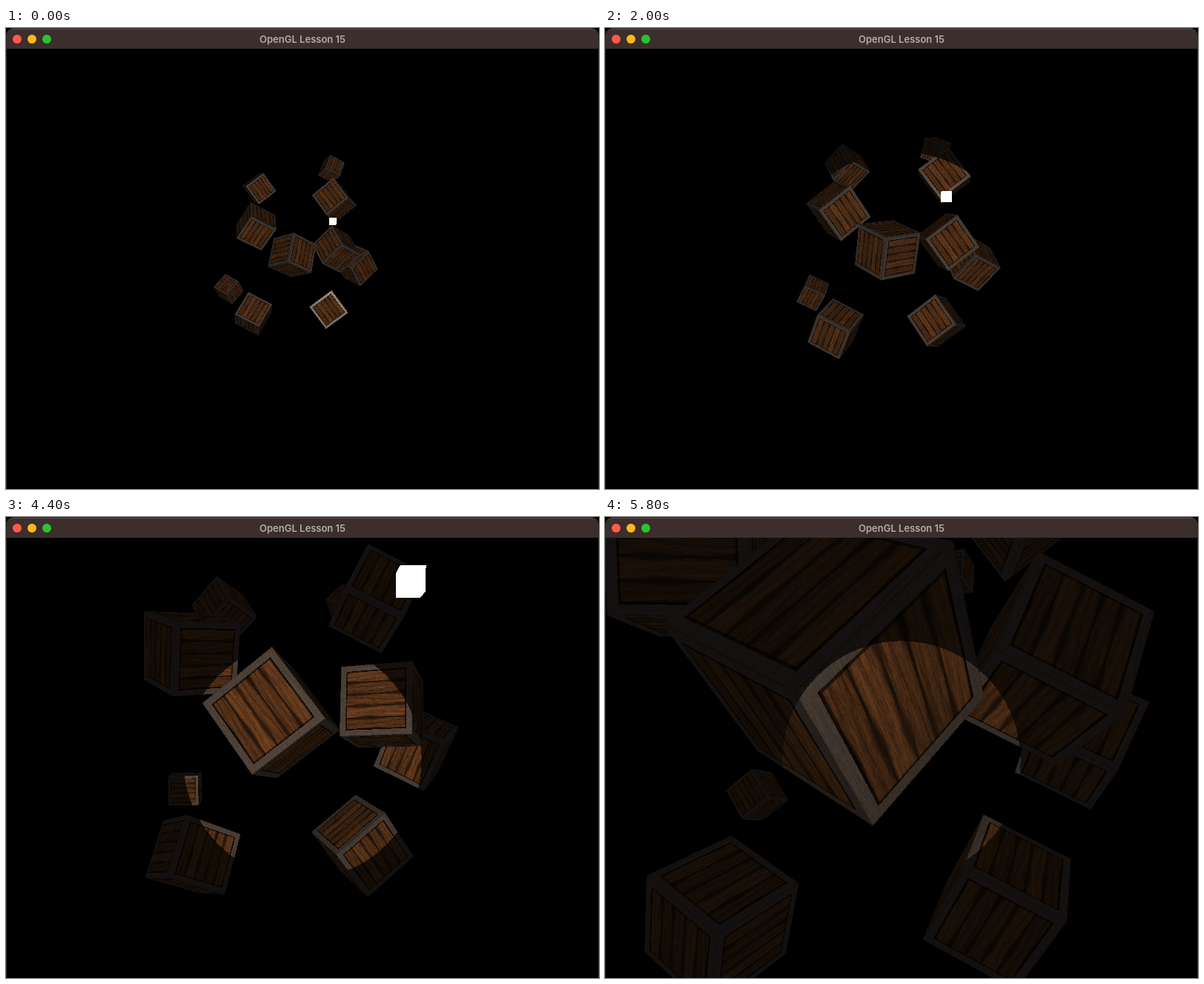
An HTML page with a canvas for the animation above (5900 ms loop, 800x622 px).

```html
<!DOCTYPE html>
<html>
<head>
<meta charset="utf-8">
<style>
  html, body { margin: 0; width: 100%; height: 100%; overflow: hidden; background: #000; }
  #win { position: relative; width: 800px; height: 622px; overflow: hidden; }
  canvas { position: absolute; left: 0; top: 28px; }
  #bar { position: absolute; left: 1px; top: 1px; width: 798px; height: 27px; box-sizing: border-box;
    border-top: 1px solid #5c504c; border-radius: 9px 9px 0 0; background: #3b2e2c;
    font: 600 13px/26px Inter, sans-serif; color: #b5aca8; text-align: center; }
  #bar i { position: absolute; top: 7px; width: 12px; height: 12px; border-radius: 50%; }
  #edge { position: absolute; inset: 0 0 -12px 0; border: 1px solid #2c2825; border-radius: 10px 10px 0 0; }
</style>
</head>
<body>
<div id="win">
  <canvas id="view" width="800" height="594"></canvas>
  <div id="edge"></div>
  <div id="bar">
    <i style="left:8px;background:#ff5a46"></i>
    <i style="left:28px;background:#ffb81c"></i>
    <i style="left:48px;background:#28c430"></i>
    OpenGL Lesson 15
  </div>
</div>
<script>
const W = 800, H = 594, CX = 400, CY = 300;
const FOCAL = 300 / Math.tan(Math.PI / 8);        // 45 degree field of view
const SPOT = Math.tan(12.5 * Math.PI / 180) ** 2;
const LOOP = 5900, STEP = 100, SPEED = 2.5;
const YAW = -0.004, PITCH = 0.0405;
const CUBES = [
  [0, 0, 0], [2, 5, -15], [-1.5, -2.2, -2.5], [-3.8, -2, -12.3], [2.4, -0.4, -3.5],
  [-1.7, 3, -7.5], [1.3, -2, -2.5], [1.5, 2, -2.5], [1.5, 0.2, -1.5], [-1.3, 1, -1.5]
];
const LAMP = [1.2, 1, 2];

const ctx = document.getElementById('view').getContext('2d');
const image = ctx.createImageData(W, H), px = image.data;
const depth = new Float32Array(W * H);

const dot = (a, b) => a[0] * b[0] + a[1] * b[1] + a[2] * b[2];
const mul = (a, k) => a.map(x => x * k);
const add = (a, b) => a.map((x, i) => x + b[i]);

// Crate texture: metal rim around horizontal planks
const N = 160, RIM = 0.08, PLANKS = 5;
const shade = new Float32Array(N * N), metal = new Uint8Array(N * N);
let seed = 7;
const rnd = () => (seed = seed * 16807 % 2147483647) / 2147483647;
const tone = Array.from({ length: PLANKS }, () => 0.9 + 0.25 * rnd());
for (let j = 0; j < N; j++) {
  let streak = 0;
  for (let i = 0; i < N; i++) {
    const u = (i + 0.5) / N, v = (j + 0.5) / N, k = j * N + i;
    const edge = Math.min(u, 1 - u, v, 1 - v);
    streak = streak * 0.92 + (rnd() - 0.5) * 0.16;
    if (edge < RIM) {
      metal[k] = 1;
      shade[k] = 0.95 + (rnd() - 0.5) * 0.15 + streak * 0.4;
      if (edge < 0.008) shade[k] *= 0.8;
    } else {
      const wave = 0.06 * Math.sin(u * 9 + v * 5);
      const p = (v - RIM) / (1 - 2 * RIM) * PLANKS;
      const row = Math.min(PLANKS - 1, Math.floor(p));
      const gap = Math.min(p - row, row + 1 - p);
      const grain = Math.sin(v * 95 + 2 * Math.sin(u * 5 + row * 2));
      shade[k] = tone[row] + 0.1 * grain + streak;
      shade[k] *= Math.min(1, 0.35 + (gap + wave * (gap > 0.06)) * 4);
      if (edge < RIM + 0.018) shade[k] *= 0.4;
    }
  }
}

// World direction to camera axes: right, up, forward
const cy = Math.cos(YAW), sy = Math.sin(YAW), cp = Math.cos(PITCH), sp = Math.sin(PITCH);
const toView = ([x, y, z]) => [
  x * cy + z * sy,
  x * sy * sp + y * cp - z * cy * sp,
  x * sy * cp - y * sp - z * cy * cp
];

// Rotation about (0.5, 1, 0), given as the three turned axes
function turned(angle) {
  const c = Math.cos(angle), s = Math.sin(angle), k = 1 - c;
  const ax = Math.sqrt(0.2), ay = 2 * ax;
  return [
    [c + 0.2 * k, 0.4 * k, -ay * s],
    [0.4 * k, c + 0.8 * k, ax * s],
    [ay * s, -ax * s, c]
  ].map(toView);
}

function drawFace(mid, U, V, n, size, lamp) {
  const facing = dot(n, mid);
  if (facing >= 0) return;
  let x0 = W, x1 = 0, y0 = H, y1 = 0;
  for (const a of [-0.5, 0.5]) for (const b of [-0.5, 0.5]) {
    const p = add(mid, add(mul(U, a * size), mul(V, b * size)));
    const f = FOCAL / Math.max(p[2], 0.05), x = CX + p[0] * f, y = CY - p[1] * f;
    x0 = Math.min(x0, x); x1 = Math.max(x1, x);
    y0 = Math.min(y0, y); y1 = Math.max(y1, y);
  }
  x0 = Math.max(0, Math.floor(x0)); x1 = Math.min(W, Math.ceil(x1));
  y0 = Math.max(0, Math.floor(y0)); y1 = Math.min(H, Math.ceil(y1));
  const mu = dot(mid, U), mv = dot(mid, V);

  for (let y = y0; y < y1; y++) {
    const dy = (CY - y - 0.5) / FOCAL;
    for (let x = x0; x < x1; x++) {
      const dx = (x + 0.5 - CX) / FOCAL;
      const slope = n[0] * dx + n[1] * dy + n[2];
      if (slope >= 0) continue;
      const z = facing / slope, k = y * W + x;
      if (z >= depth[k]) continue;
      const u = (z * (U[0] * dx + U[1] * dy + U[2]) - mu) / size + 0.5;
      if (u < 0 || u >= 1) continue;
      const v = (z * (V[0] * dx + V[1] * dy + V[2]) - mv) / size + 0.5;
      if (v < 0 || v >= 1) continue;
      depth[k] = z;
      const o = k * 4;
      if (lamp) {
        px[o] = px[o + 1] = px[o + 2] = 255;
        continue;
      }
      const q = Math.floor(v * N) * N + Math.floor(u * N), t = shade[q];
      const off = dx * dx + dy * dy;
      let diff = 0, spec = 0;
      if (off < SPOT) {
        const ndl = -slope / Math.sqrt(1 + off);
        diff = ndl * 1.1 / (1 + 0.02 * z);
        if (metal[q]) spec = 100 * Math.max(0, 2 * ndl * ndl - 1) ** 32;
      }
      if (metal[q]) {
        px[o] = t * (20 + 66 * diff + spec);
        px[o + 1] = t * (17 + 55 * diff + spec);
        px[o + 2] = t * (16 + 45 * diff + spec);
      } else {
        px[o] = t * (21 + 72 * diff);
        px[o + 1] = t * (13 + 41 * diff);
        px[o + 2] = t * (6 + 21 * diff);
      }
    }
  }
}

function drawCube(pos, axes, size, dist, lamp) {
  const mid = add(toView(pos), [-0.33, 0.505, dist]);
  const [ex, ey, ez] = axes, back = mul(ez, -1);
  const sides = [[ex, ey, back], [ey, ex, back], [ez, ex, ey]];
  for (const [n, U, V] of sides) for (const s of [-1, 1]) {
    drawFace(add(mid, mul(n, s * size / 2)), U, V, mul(n, s), size, lamp);
  }
}

function render(t) {
  depth.fill(1e9);
  for (let i = 0; i < px.length; i += 4) {
    px[i] = px[i + 1] = px[i + 2] = 0;
    px[i + 3] = 255;
  }
  const dist = 17.33 - SPEED * t;
  CUBES.forEach((pos, i) => {
    const angle = (50 + 20 * i) * (t - 1.081) * Math.PI / 180;
    drawCube(pos, turned(angle), 1, dist, false);
  });
  drawCube(LAMP, turned(0), 0.2, dist, true);
  ctx.putImageData(image, 0, 0);
}

const start = performance.now();
let shown = -1;
function tick() {
  const step = Math.floor((performance.now() - start) % LOOP / STEP);
  if (step !== shown) {
    shown = step;
    render(step * STEP / 1000);
  }
  requestAnimationFrame(tick);
}
tick();
</script>
</body>
</html>
```
